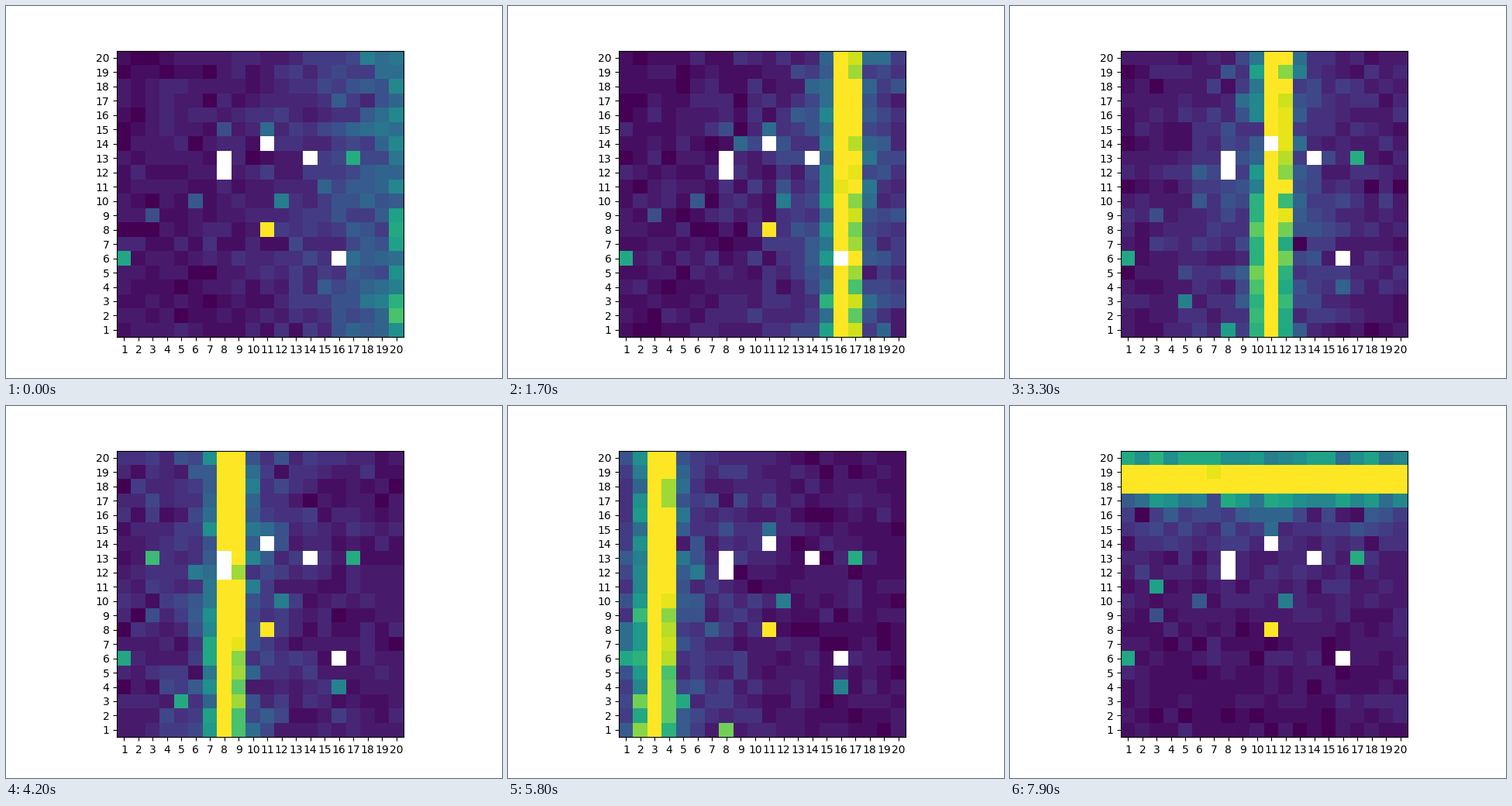
Write a matplotlib script that moves like this. It is 640 by 480 pixels and loops after 8 s.

```python
import numpy as np
import matplotlib.pyplot as plt
from matplotlib.animation import FuncAnimation

N, FRAMES, STEP = 20, 80, 100
LEVELS = 28          # values come in steps of 1 / LEVELS
TURN = 6.9           # the second sweep starts here, in seconds

rng = np.random.default_rng(12)
noise = rng.standard_normal((FRAMES, N, N))
noise = sum(np.roll(noise, k, axis=0) for k in (-1, 0, 1)) / np.sqrt(3)

# short random flashes: when, how high, and on which cells
flash_time = rng.uniform(0, 8, 16)
flash_level = rng.uniform(.4, 1, 16)
flash_row, flash_col = rng.integers(0, N, (2, 16))

cols, rows = np.meshgrid(np.arange(1, N + 1), np.arange(1, N + 1))
mid = (N + 1) / 2

# (column, row) of dead cells, and of cells with a level of their own
DEAD = [(8, 12), (8, 13), (11, 14), (14, 13), (16, 6)]
STEADY = {(11, 8): 1, (1, 6): .6, (17, 13): .62, (12, 10): .42,
          (11, 15): .35, (6, 10): .27, (3, 9): .24, (8, 15): .24}
SWELLING = {(8, 1): .8, (5, 3): .62, (16, 4): .45, (6, 12): .42}


def grid(cells):
    g = np.zeros((N, N))
    for (c, r), level in cells.items():
        g[r - 1, c - 1] = level
    return g


steady, swelling = grid(STEADY), grid(SWELLING)
dead = grid(dict.fromkeys(DEAD, 1)) > 0


def wave(along, across, t, width):
    """Slightly slanted bright bar moving from cell 20 to 1, with a soft tail."""
    center = 21.75 - 3.2 * t
    outside = np.clip(max(1 - center, center - N) / 1.4, 0, 1)
    d = np.abs(along - center - .022 * across)
    core = 1.2 * np.exp(-(d / width) ** 2)
    tail = (.27 + .22 * outside) * np.exp(-d / (4 + outside))
    return core + tail


def field(i):
    t = i * STEP / 1000
    fade = np.clip((7.4 - t) / .5, 0, 1)
    v = .04 + fade * wave(cols, rows - mid, t, .97)
    if t > TURN:
        v += (1 - fade) * wave(rows, mid - cols, t - TURN, 1.2)
    v += .7 * np.sqrt(v / LEVELS) * noise[i]
    v = np.round(v * LEVELS) / LEVELS

    swell = np.exp(-((t - 5) / 2.2) ** 4)
    v = np.maximum(v, np.maximum(steady, swell * swelling))
    flash = flash_level * np.exp(-((t - flash_time) / .2) ** 2)
    np.maximum.at(v, (flash_row, flash_col), flash)
    v[dead] = np.nan
    return np.clip(v, 0, 1)


fig, ax = plt.subplots(figsize=(6.4, 4.8), dpi=100)
image = ax.imshow(field(0), origin="lower", cmap="viridis", vmin=0, vmax=1)
labels = range(1, N + 1)
ax.set_xticks(range(N), labels)
ax.set_yticks(range(N), labels)


def update(i):
    image.set_data(field(i))
    return [image]


anim = FuncAnimation(fig, update, frames=FRAMES, interval=STEP,
                     repeat=True, repeat_delay=0)
plt.show()
```
